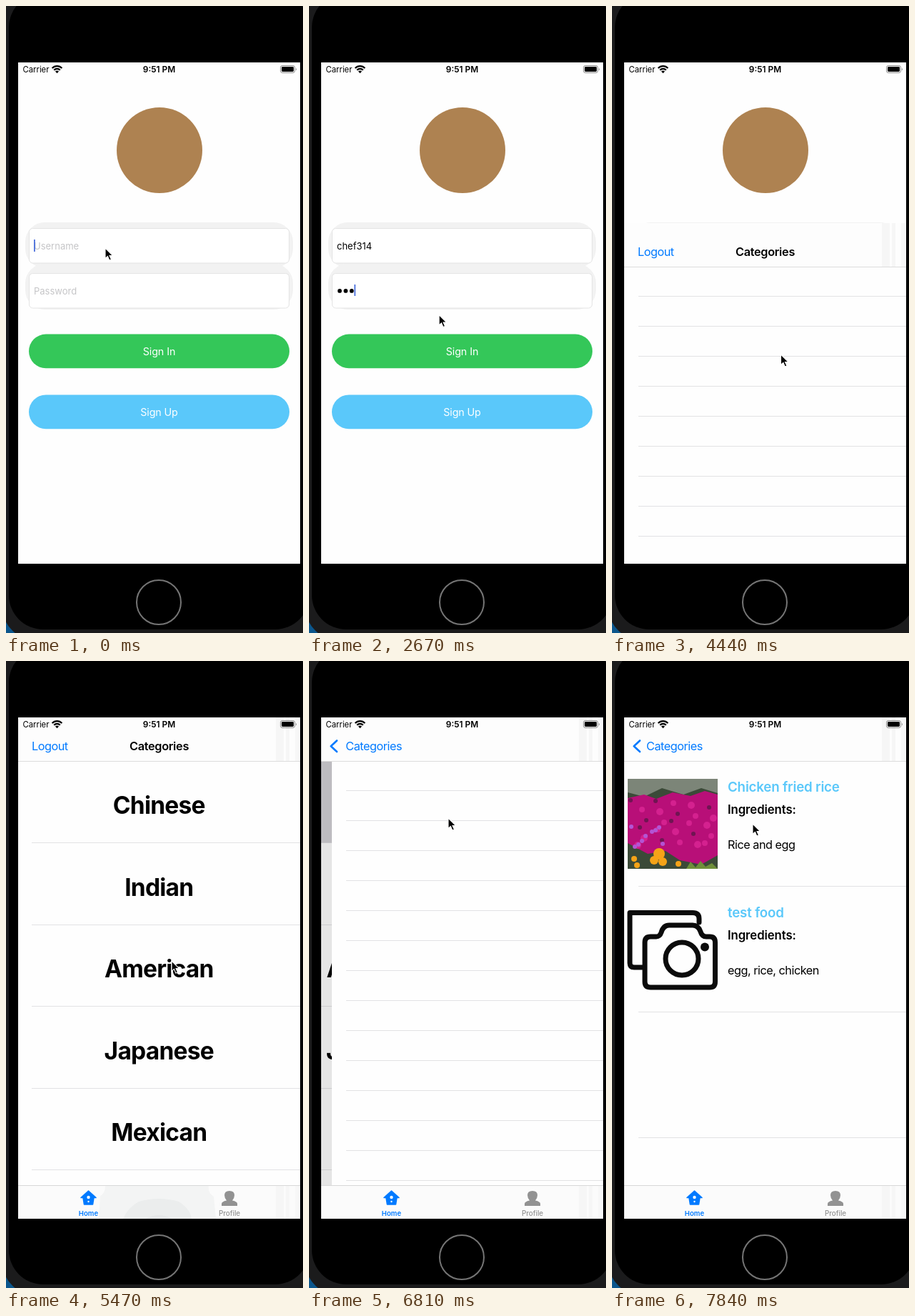
Recreate the animation shown at these times as an HTML page. Size 416 px wide and 878 px high, loop 7990 ms.

```html
<!DOCTYPE html>
<html lang="en">
<head>
<meta charset="utf-8">
<title>Recipe app walkthrough</title>
<style>
  html, body { margin: 0; width: 100%; height: 100%; overflow: hidden; background: #000; }
  svg { display: block; width: 416px; height: 878px; }
  text { font-family: Inter, Roboto, sans-serif; font-optical-sizing: none; white-space: pre; }
</style>
</head>
<body>
<svg id="stage" viewBox="0 0 416 878" xmlns="http://www.w3.org/2000/svg"></svg>
<script>
const LOOP = 7990, STEP = 147.8;
const BLUE = '#007aff', CYAN = '#5ac8fa', GRAY = '#929292', LINE = '#e2e2e4', PAPER = '#fefefe';
const USER = 'chef314';
const TYPE_STEPS = [3, 4, 5, 7, 8, 9, 10];
const DOT_STEPS = [14, 15, 16];
const POINTER = [[0, 139, 339], [7, 139, 339], [10, 164, 414], [17, 164, 414], [21, 236.5, 488],
  [33, 236.5, 488], [37, 232, 420], [40, 205, 166], [42, 195, 220], [51, 195, 220], [53, 197, 228]];

const stage = document.getElementById('stage');
const measure = document.createElement('canvas').getContext('2d');

const rect = (x, y, w, h, fill, extra = '') =>
  `<rect x="${x}" y="${y}" width="${w}" height="${h}" fill="${fill}" ${extra}/>`;
const circle = (x, y, r, fill, extra = '') =>
  `<circle cx="${x}" cy="${y}" r="${r}" fill="${fill}" ${extra}/>`;
const path = (d, fill, extra = '') => `<path d="${d}" fill="${fill}" ${extra}/>`;
const text = (x, y, size, str, fill = '#000', weight = 400, spacing = 0, anchor = 'start', extra = '') =>
  `<text x="${x}" y="${y}" font-size="${size}" fill="${fill}" font-weight="${weight}" letter-spacing="${spacing}" text-anchor="${anchor}" ${extra}>${str}</text>`;
const shift = (x, y, content) => `<g transform="translate(${x} ${y})">${content}</g>`;
const line = (x, y) => rect(x, y, 412 - x, 1, LINE);
const times = (n, draw) => Array.from({ length: n }, (_, i) => draw(i)).join('');
const reached = (steps, k) => steps.filter(s => s <= k).length;

function pointerAt(k) {
  const next = POINTER.findIndex(p => p[0] > k);
  if (next < 0) return POINTER.at(-1).slice(1);
  const [k0, x0, y0] = POINTER[next - 1], [k1, x1, y1] = POINTER[next];
  const u = (k - k0) / (k1 - k0);
  return [x0 + (x1 - x0) * u, y0 + (y1 - y0) * u];
}

const device =
  rect(0, 0, 416, 878, '#0b568c') +
  rect(-6, -30, 455, 919, '#1b1b1c', 'rx="50"') +
  rect(4, -18, 421, 891, '#000', 'rx="48"') +
  circle(214, 835, 31, 'none', 'stroke="#757575" stroke-width="2"');

const arc = r => path(`M${71.5 - r * .74} ${94 - r * .74}A${r} ${r} 0 0 1 ${71.5 + r * .74} ${94 - r * .74}`,
  'none', 'stroke="#000" stroke-width="2.2"');
const statusBar =
  text(23.5, 93, 11.3, 'Carrier') + arc(9.3) + arc(5.8) +
  path('M71.5 94.3L69 91.6Q71.5 89.6 74 91.6Z', '#000') +
  text(214.5, 93, 11.9, '9:51 PM', '#000', 600, 0, 'middle') +
  rect(384.5, 83.5, 20, 10, 'none', 'rx="2.6" stroke="#8a8a8a"') +
  rect(386, 85, 17, 7, '#000', 'rx="1.4"') +
  path('M406 87Q408 88.5 406 90.5Z', '#8a8a8a');

const stripes = (y, h) => rect(378, y, 11, h, '#f6f6f6') + rect(392, y, 5, h, '#f6f6f6') + rect(405, y, 7, h, '#f7f7f7');

const navBar = content => rect(17, 79, 395, 61, '#fdfdfd') + stripes(79, 61) + rect(17, 140, 395, 1, '#dcdcdc') + content;

const tabBar = shaded =>
  rect(17, 735, 395, 46, '#fbfbfb') + stripes(735, 46) +
  (shaded ? path('M139 735H284Q282 744 291 750L294 781H130L132 749Q139 745 139 735Z', '#f3f4f4') +
    path('M164 781Q171 765 186 757Q214 749 242 757Q258 767 260 781Z', '#ebeded') +
    path('M196 781Q214 771 232 781Z', '#e5e7e8') : '') +
  rect(17, 734, 395, 1, '#d8d8d8') +
  path('M115.5 742L126 751.5H123L121.5 761H109.5L108 751.5H105Z', BLUE, `stroke="${BLUE}" stroke-width="1.6" stroke-linejoin="round"`) +
  circle(115.5, 751, 2.2, '#fff') + circle(115.5, 757, 1.2, '#fff') +
  text(115.5, 777, 9.6, 'Home', BLUE, 600, 0, 'middle') +
  path('M302 763V760Q302 757 309 755.5Q306 752 306 748Q306 742 313 742Q320 742 320 748Q320 752 317 755.5Q324 757 324 760V763Z', GRAY) +
  text(313, 777, 9.8, 'Profile', GRAY, 500, 0, 'middle');

const caret = (x, y, h) => rect(x, y, 1.8, h, '#4a6fdc');
const field = y => rect(32.5, y, 364, 48.5, '#fff', 'rx="5" stroke="#e4e4e4"');
const button = (y, fill, label, alpha = 1) =>
  rect(32, y, 365, 47.7, fill, 'rx="23.8"') +
  text(214.5, y + 29.2, 14.3, label, '#fff', 400, -.1, 'middle', `opacity="${alpha}"`);

function login(k) {
  const typed = USER.slice(0, reached(TYPE_STEPS, k));
  const dots = reached(DOT_STEPS, k);
  measure.font = '13px Inter, Roboto, sans-serif';
  const focus = k < 12
    ? caret(39 + measure.measureText(typed).width, 327, 17)
    : caret(38.8 + 8.2 * dots, 390, 16);
  return rect(17, 79, 395, 702, PAPER) +
    circle(215, 202, 60, '#ae8251') +
    rect(27, 303, 375, 64, '#f2f2f2', 'rx="27"') + rect(27, 361, 375, 64, '#f2f2f2', 'rx="27"') +
    field(311.5) + field(374.5) +
    (typed ? text(39, 340.5, 13, typed) : text(39, 340.5, 13, 'Username', '#c5c5c7')) +
    (dots ? times(dots, i => circle(43 + 8.4 * i, 398.9, 2.9, '#000')) : text(39, 403.5, 13, 'Password', '#c5c5c7')) +
    focus +
    button(459.6, '#34c759', 'Sign In', [.3, .6, .85][k - 22] ?? 1) +
    button(544.5, CYAN, 'Sign Up');
}

const emptyLines = times(14, i => line(37, 181 + 42 * i));

function categoryList(k) {
  if (k < 34) return rect(17, 140, 395, 595, PAPER) + emptyLines;
  const names = ['Chinese', 'Indian', 'American', 'Japanese', 'Mexican'];
  return rect(17, 140, 395, 595, PAPER) +
    names.map((name, i) => line(36, Math.round(254 + 114.5 * i)) +
      (i == 0 && k >= 44 ? rect(17, 140, 395, 114.5, '#d1d0d5') : '') +
      text(214.3, 214 + 114.5 * i, 33.5, name, '#000', 700, -.75, 'middle')).join('');
}

const categories = k => categoryList(k) +
  navBar(text(36, 125, 16.3, 'Logout', BLUE, 400, -.5) +
    text(214.5, 125, 16.3, 'Categories', '#000', 600, -.3, 'middle')) +
  tabBar(true);

const flowers =
  rect(22, 165, 126, 126, '#3b4a38') +
  path('M22 165H148V185L125 178L100 187L70 178L45 190L22 184Z', '#7c8578') +
  path('M22 192L45 187L62 193L85 184L110 189L130 182L148 187V272L125 285L95 279L75 266L50 270L22 255Z', '#b80f78') +
  times(26, i => circle(26 + (i * 47) % 119, 195 + (i * 31) % 65, 3 + i % 3, i % 3 ? '#d4218f' : '#6f1552')) +
  times(9, i => circle(27 + (i * 29) % 53, 232 + (i * i * 7) % 29, 3, '#b355d4')) +
  path('M104 291L110 281L117 289L124 280L131 288L140 283L148 291Z', '#6f8f3a') +
  [[66, 270, 8], [59, 279, 6], [71, 281, 6], [31, 277, 4], [35, 286, 4], [93, 284, 4]]
    .map(([x, y, r]) => circle(x, y, r, '#f5a318')).join('');

const cameras = `<g fill="none" stroke="#0b0b0b" stroke-width="7" stroke-linejoin="round" stroke-linecap="round">` +
  path('M43 429H31Q25 429 25 423V352.5H113Q122 352.5 122 361V366', 'none') +
  path('M46 394Q46 386 54 386H62Q67 386 69 380Q72 370 80 370H113Q121 370 124 379Q126 386 132 386H137Q144.5 386 144.5 394V449Q144.5 457 137 457H54Q46 457 46 449Z', 'none') +
  circle(98, 417, 23, 'none') + '</g>' + circle(130, 400.5, 6, '#0b0b0b');

const dish = (y, name, ingredients) =>
  text(162, y, 18.8, name, CYAN, 600, -.22) +
  text(162, y + 31, 16.8, 'Ingredients:', '#000', 600, -.1) +
  text(162, y + 80, 16.3, ingredients, '#000', 400, -.5);

const dishes = k => rect(17, 140, 395, 595, PAPER) + (k < 49 ? emptyLines :
  times(3, i => line(37, 315 + 176 * i)) +
  dish(183, 'Chicken fried rice', 'Rice and egg') + dish(359, 'test food', 'egg, rice, chicken') +
  (k < 52 ? '' : flowers + cameras));

function pushed(k) {
  const offset = [230, 15][k - 45] ?? 0, progress = 1 - offset / 395;
  return shift(-118 * progress, 0, categoryList(k)) +
    rect(17, 140, 395, 595, '#000', `opacity="${.1 * progress}"`) +
    shift(offset, 0, dishes(k)) +
    navBar(path('M39 111.5L30.7 119.3L39 127', 'none', `stroke="${BLUE}" stroke-width="2.6" stroke-linecap="round" stroke-linejoin="round"`) +
      text(48 + .22 * offset, 125, 16.3, 'Categories', BLUE, 400, -.5)) +
    tabBar(false);
}

function screen(k) {
  if (k >= 45) return pushed(k);
  if (k < 29) return login(k);
  const drop = [605, 225, 40][k - 29] ?? 0;
  return (drop ? login(k) : '') + shift(0, drop, categories(k));
}

const arrow = path('M0 0V14.5L3.4 11.4L5.8 17L8.4 15.9L6 10.5H10.6Z', '#000', 'stroke="#fff" stroke-width="1.1"');

function draw(k) {
  stage.innerHTML = '<clipPath id="glass"><rect x="17" y="79" width="395" height="702"/></clipPath>' +
    device + `<g clip-path="url(#glass)">${screen(k)}${statusBar}</g>` + shift(...pointerAt(k), arrow);
}

let shown = -1;
function tick() {
  const k = Math.min(53, Math.floor(performance.now() % LOOP / STEP));
  if (k !== shown) draw(shown = k);
  requestAnimationFrame(tick);
}
tick();
</script>
</body>
</html>
```
